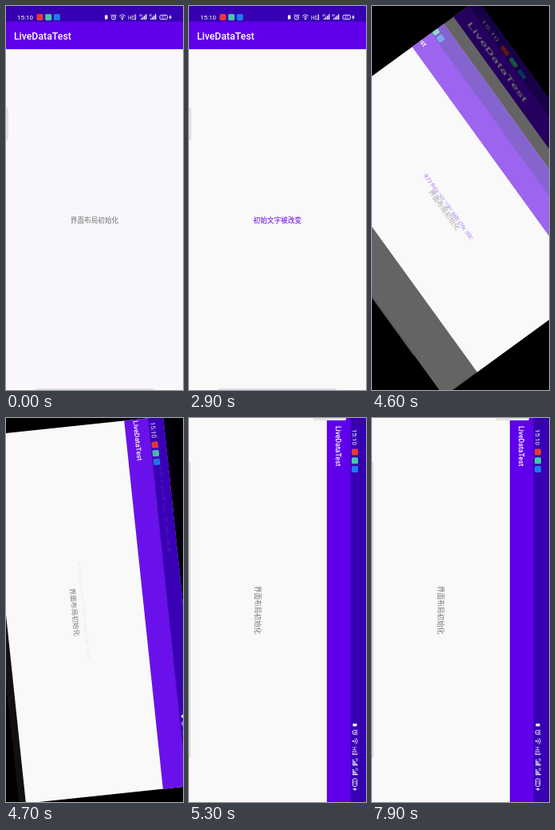
An HTML page that plays this animation: 222 by 480 pixels, repeating every 8000 ms.

```html
<!DOCTYPE html>
<html lang="zh-CN">
<head>
<meta charset="utf-8">
<style>
html, body { margin: 0; width: 222px; height: 480px; overflow: hidden; background: #000; }
svg { display: block; }
text { font-family: Roboto, "Noto Sans", sans-serif; fill: #fff; }
.title { font-weight: 500; }
.label { font: 8.63px "Noto Sans CJK SC", "Noto Sans CJK", sans-serif; text-anchor: middle; fill: #757575; }
.line { fill: none; stroke: #fff; stroke-width: .9; }
</style>
</head>
<body>
<svg width="222" height="480" viewBox="0 0 222 480">
  <defs><clipPath id="clip"><rect id="frame" width="222" height="480"/></clipPath></defs>
  <rect width="222" height="480"/>
  <g clip-path="url(#clip)"><g id="landscape"></g></g>
  <g id="portrait"></g>
</svg>
<script>
const LOOP = 8000, STEP = 100;
const TEXT_CHANGE = 1700, ROTATE_START = 4533, ROTATE_TIME = 400;
const W = 222, H = 480, CX = W / 2, CY = H / 2;
const $ = id => document.getElementById(id);

const rect = (x, y, w, h, fill, extra = '') =>
  `<rect x="${x}" y="${y}" width="${w}" height="${h}" fill="${fill}" ${extra}/>`;

const signal = x =>
  `<text x="${x}" y="13.2" font-size="3.6">4G</text>` +
  [0, 1, 2, 3].map(i => rect(x + 2 + i * 2, 15.3 - i * 1.7, 1.3, 1.7 + i * 1.7, '#fff')).join('');

const statusIcons = () => `
  ${rect(124, 11.5, 3.4, 5, '#fff')}
  <g class="line">
    <circle cx="135" cy="14.3" r="2.7"/>
    <path d="M135 12.6v1.8h1.3M131.6 12l1.6-1.6M138.4 12l-1.6-1.6"/>
    <path d="M142.2 12.6q3.8-3.2 7.6 0M143.6 14.3q2.4-2 4.8 0"/>
    <path d="M161 11h1.6v6H161"/>
    <rect x="193" y="11.3" width="9.4" height="5.4" rx="1.6"/>
  </g>
  <circle cx="146" cy="16.1" r="1.1" fill="#fff"/>
  <text x="153" y="16.6" font-size="6.4">HD</text>
  ${signal(167)}${signal(179)}
  <text x="195.2" y="15.8" font-size="4.6">61</text>
  <path d="M206.8 10.6l-2.8 3.9h1.8l-.6 3 2.9-4h-1.9z" fill="#fff"/>`;

function screen({ w, h, bar, titleSize, titleY, handle, nav }) {
  const icons = ['#e83a34', '#3fcaa6', '#1a7cec']
    .map((color, i) => rect(38.5 + i * 10.7, 10, 8, 8, color, 'rx="1.5"')).join('');
  return `
    <rect class="page" width="${w}" height="${h}" fill="#f9f9f9"/>
    ${rect(0, 0, w, bar, '#6000ea')}
    ${rect(0, 0, w, 19.5, '#3700b3')}
    <text x="14" y="16.8" font-size="8">15:10</text>${icons}
    <g transform="translate(${w - W})">${statusIcons()}</g>
    <text class="title" x="9.9" y="${titleY}" font-size="${titleSize}">LiveDataTest</text>
    <text class="label" x="${w / 2}" y="${(bar + h) / 2 + 3.7}">界面布局初始化</text>
    <g class="edges">
      <rect class="handle" x="-2" y="${handle}" width="5" height="41" rx="1.5" fill="#e3e3e5"/>
      <rect x="${nav}" y="${h - 2}" width="${w - 2 * nav}" height="3" rx="1" fill="#dedee0"/>
    </g>`;
}

$('portrait').innerHTML = screen({ w: W, h: H, bar: 54, titleSize: 12.33, titleY: 41.6, handle: 127, nav: 37 });
$('landscape').innerHTML = screen({ w: H, h: W, bar: 49.1, titleSize: 8.63, titleY: 38, handle: 25, nav: 55 });

const page = document.querySelector('#portrait .page');
const label = document.querySelector('#portrait .label');
const handle = document.querySelector('#portrait .handle');
const landscapeEdges = document.querySelector('#landscape .edges');

function draw(time) {
  const t = Math.floor(time / STEP) * STEP;
  const changed = t >= TEXT_CHANGE;
  page.setAttribute('fill', t < 100 ? '#f9f7fb' : '#f9f9f9');
  label.textContent = changed ? '初始文字被改变' : '界面布局初始化';
  label.style.fill = changed ? '#6200ee' : '#757575';
  handle.setAttribute('opacity', t < 4200 ? 1 : t < 4300 ? 0.5 : 0);
  landscapeEdges.setAttribute('opacity', t < 4800 ? 0 : 1);

  // Quintic ease-out: the old screen stretches to the new shape while it fades.
  const x = Math.min(1, Math.max(0, (t - ROTATE_START) / ROTATE_TIME));
  const p = 1 - (1 - x) ** 5;
  const turn = `translate(${CX} ${CY}) rotate(${90 * p})`;
  const sx = 1 + (H / W - 1) * p, sy = 1 + (W / H - 1) * p;
  const stretch = `${turn} scale(${sx} ${sy}) translate(${-CX} ${-CY})`;
  $('frame').setAttribute('transform', stretch);
  $('portrait').setAttribute('transform', stretch);
  $('portrait').setAttribute('opacity', 1 - p);
  $('landscape').setAttribute('transform', `${turn} translate(${-CY} ${-CX})`);
}

const start = performance.now();
function tick() {
  draw((performance.now() - start) % LOOP);
  requestAnimationFrame(tick);
}
tick();
</script>
</body>
</html>
```
